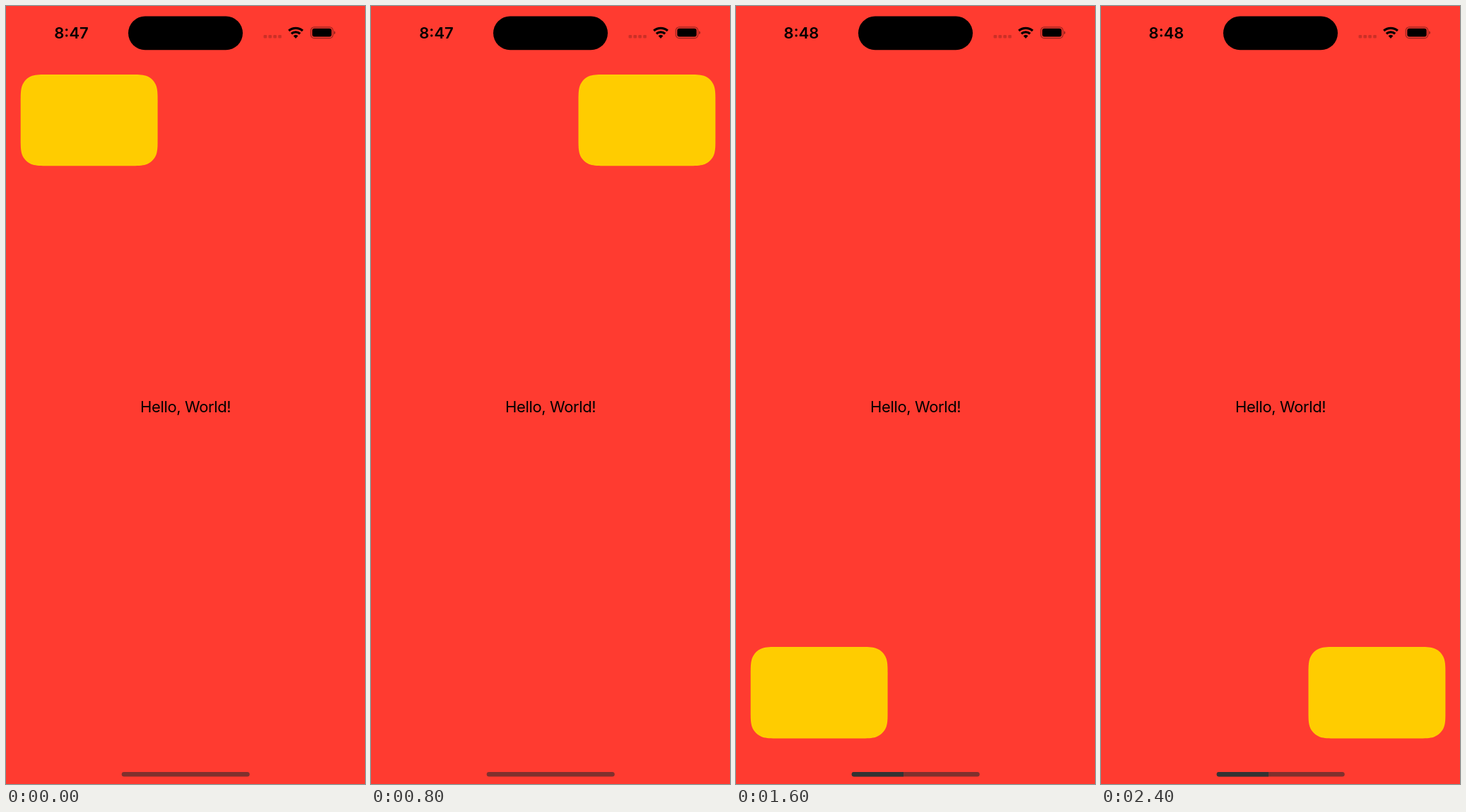
Recreate the animation shown at these times as an HTML page. Size 508 px wide and 1101 px high, loop 3200 ms.

```html
<!DOCTYPE html>
<html lang="en">
<head>
<meta charset="utf-8">
<title>Card in four corners</title>
<style>
  html, body { margin: 0; width: 100%; height: 100%; overflow: hidden; background: #ff3b30; }
  svg { display: block; width: 100%; height: 100%; }
  text { font: 22px Inter, sans-serif; text-anchor: middle; }
  #clock { font-weight: 600; }
  #greeting { letter-spacing: -0.37px; }
</style>
</head>
<body>
<svg viewBox="0 0 508 1101">
  <rect width="508" height="1101" fill="#ff3b30"/>

  <text id="clock" x="92.5" y="46"></text>
  <rect x="173" y="14.4" width="162" height="47.8" rx="23.9"/>

  <!-- Signal dots -->
  <g opacity=".2">
    <rect x="364.5" y="41" width="4.6" height="4.6" rx="1"/>
    <rect x="371.4" y="41" width="4.6" height="4.6" rx="1"/>
    <rect x="378.3" y="41" width="4.6" height="4.6" rx="1"/>
    <rect x="385.2" y="41" width="4.6" height="4.6" rx="1"/>
  </g>

  <!-- Wi-Fi -->
  <g transform="translate(410 46)">
    <path d="M-9.8-10.9A14.7 14.7 0 0 1 9.8-10.9M-6.15-6.8A9.2 9.2 0 0 1 6.15-6.8"
          fill="none" stroke="#000" stroke-width="3.3"/>
    <path d="M0 0L-3.4-3.8A5.1 5.1 0 0 1 3.4-3.8Z"/>
  </g>

  <!-- Battery -->
  <rect x="431.3" y="29.8" width="31.4" height="15.8" rx="4.8" fill="none" stroke="#000" stroke-width="1.2" opacity=".4"/>
  <rect x="433.3" y="31.8" width="27.4" height="11.8" rx="3"/>
  <path d="M464.2 35.2Q466 36 466 37.7T464.2 40.2Z" opacity=".45"/>

  <text id="greeting" x="254.2" y="574.7">Hello, World!</text>
  <path id="card" fill="#fc0"/>

  <rect x="163.7" y="1084" width="181" height="6.5" rx="3.25" fill="#80302d"/>
  <path id="indicator" d="M237 1084H166.95a3.25 3.25 0 0 0 0 6.5H237Z" fill="#333"/>
</svg>
<script>
const STEP = 800;
const byId = id => document.getElementById(id);
const [clock, card, indicator] = ["clock", "card", "indicator"].map(byId);

// Rounded rectangle whose corners have continuous curvature.
function smoothRect(w, h, r) {
  const corner = [[1.5287, 0], [1.0885, 0], [.8684, 0], [.6315, .0749], [.3728, .1691],
                  [.1691, .3728], [.0749, .6315], [0, .8684], [0, 1.0885], [0, 1.5287]];
  const place = (points, flipX, flipY) => points.map(([x, y]) =>
    [flipX ? w - x * r : x * r, flipY ? h - y * r : y * r]);
  const reversed = [...corner].reverse();
  return [place(corner, 0, 0), place(reversed, 0, 1), place(corner, 1, 1), place(reversed, 1, 0)]
    .map(([start, ...curve], i) => `${i ? "L" : "M"}${start}C${curve.join(" ")}`).join("") + "Z";
}

card.setAttribute("d", smoothRect(193.9, 129.3, 25.85));

function draw(now) {
  const step = Math.floor(now / STEP) % 4;
  const right = step % 2 === 1;
  const bottom = step >= 2;
  card.setAttribute("transform", `translate(${right ? 293.5 : 20.7} ${bottom ? 907.1 : 96.9})`);
  clock.textContent = bottom ? "8:48" : "8:47";
  indicator.style.display = bottom ? "" : "none";
}

const start = performance.now();
function loop() {
  draw(performance.now() - start);
  requestAnimationFrame(loop);
}
loop();
</script>
</body>
</html>
```
